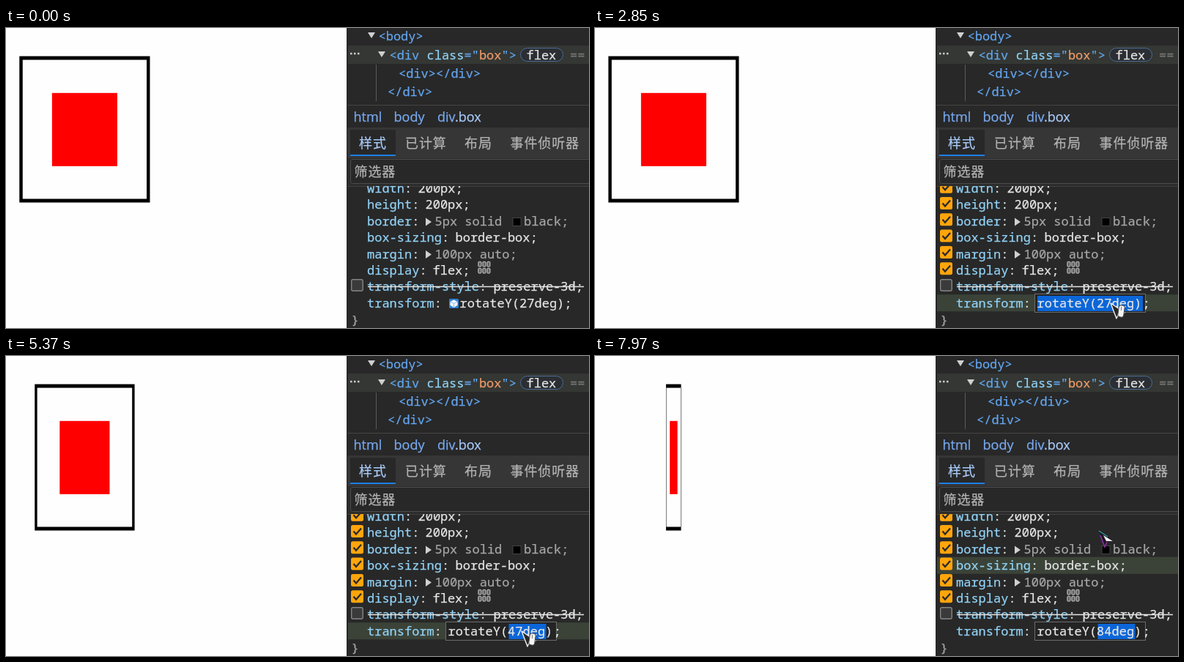
Animation, 796 px wide and 410 px high, one loop 8000 ms. Source, as an HTML page:

```html
<!DOCTYPE html>
<html lang="zh-CN">
<head>
<meta charset="utf-8">
<style>
html, body { margin: 0; width: 100%; height: 100%; overflow: hidden; background: #fefefe; }
svg { display: block; width: 796px; height: 410px; }
text { white-space: pre; }
text, tspan { fill: currentColor; stroke: currentColor; stroke-width: .25px; }
.mono { font: 17px "Noto Sans Mono", "DejaVu Sans Mono", monospace; }
.crumb { font: 18px "Open Sans", "Noto Sans", sans-serif; color: #78aaf0; }
.tab { font: 18px "Noto Sans CJK SC", "Noto Sans CJK", sans-serif; letter-spacing: .9px; color: #b2b2b2; }
.active { color: #a9cbfa; }
.tag { color: #62a5ee; }
.prop { color: #92d2f6; }
.string { color: #ee9a68; }
.val { color: #e6e6e6; }
.dim { color: #a6a6a6; }
.faint { color: #777; }
</style>
</head>
<body>
<svg viewBox="0 0 796 410" lang="zh-CN">
  <defs><clipPath id="rulesClip"><rect x="466" y="216" width="330" height="194"/></clipPath></defs>
  <rect width="796" height="410" fill="#fefefe"/>
  <g id="box">
    <rect x="-97.5" y="41" width="195" height="195" fill="none" stroke="#000" stroke-width="5"/>
    <rect x="-50" y="88.8" width="100" height="100" fill="#f00"/>
  </g>

  <rect x="465" width="331" height="410" fill="#282828"/>
  <g id="tree" class="mono">
    <rect x="467" y="24" width="329" height="25" fill="#343733"/>
    <path d="M505.5 50V100" stroke="#5a5a5a"/>
    <path d="M494 6h10l-5 8zM508 32h10l-5 8z" fill="#d0d0d0"/>
    <path d="M470 35h2.5m2.5 0h2.5m2.5 0h2.5" stroke="#ccc" stroke-width="2.5"/>
    <rect x="702.5" y="27.5" width="58" height="18" rx="9" fill="#2b2e33" stroke="#4b6a94"/>
  </g>
  <path d="M466 105.5H796" stroke="#444"/>
  <text class="crumb" x="474.5" y="128">html</text>
  <text class="crumb" x="529.5" y="128">body</text>
  <text class="crumb" x="589" y="128">div<tspan class="active">.box</tspan></text>

  <rect x="466" y="136" width="330" height="42" fill="#363636"/>
  <rect x="470" y="139" width="62" height="36" fill="#282828"/>
  <rect x="470" y="173" width="62" height="2" fill="#1c7fe6"/>
  <text class="tab active" x="482" y="164">样式</text>
  <text class="tab" x="545" y="164">已计算</text>
  <text class="tab" x="626" y="164">布局</text>
  <text class="tab" x="688.5" y="164">事件侦听器</text>
  <rect x="466" y="178" width="330" height="38" fill="#2c2c2c"/>
  <rect x="470.5" y="179.5" width="335" height="33" rx="3" fill="#282828" stroke="#4c4c4c"/>
  <text class="tab" x="475.5" y="203">筛选器</text>
  <path d="M466 216.5H796" stroke="#404040"/>

  <g class="mono" clip-path="url(#rulesClip)">
    <rect id="hover" x="467" width="329" height="23" fill="#3b4338"/>
    <g id="rules"></g>
    <g id="checks"></g>
    <rect x="471.7" y="343.7" width="15.5" height="15.5" rx="2" fill="#3a3a3a" stroke="#858585" stroke-width="1.4"/>
    <path d="M573 259.5l8 5.5-8 5.5zM573 304l8 5.5-8 5.5z" fill="#d0d0d0"/>
    <rect x="692" y="259.5" width="11" height="11" fill="#000" stroke="#444"/>
    <g id="gridIcon" fill="#5c5c5c" stroke="#a6a6a6" stroke-width="1.5"></g>
    <path d="M494 353.5H789" stroke="#e4e4e4" stroke-width="1.5"/>
    <g id="idle">
      <rect x="605" y="370" width="13" height="13" rx="1.5" fill="#2b7fd4"/>
      <path d="M611.5 371.5l5 2.5v5l-5 3-5-3v-5z" fill="#f4f8ff"/>
      <path d="M606.5 374l5 2.5 5-2.5m-5 2.5v5" fill="none" stroke="#8db9ea"/>
      <text class="val" x="619.5" y="382">rotateY(27deg);</text>
    </g>
    <g id="editor">
      <rect x="600.5" y="363.5" width="151" height="25" fill="#242424" stroke="#6c6c6c"/>
      <rect id="selection" y="366" height="21" fill="#0b66d8"/>
      <text id="value" class="val" x="603.5" y="382"></text>
      <text class="val" x="747.5" y="382">;</text>
    </g>
  </g>

  <g id="cursor">
    <g id="arrow">
      <path d="M0 0L19 13 11 14 8 21z" fill="#282828" stroke="#f2f2f2" stroke-width="1.4" stroke-linejoin="round"/>
      <g id="badge">
        <rect x="10.5" y="3" width="8" height="16" rx="3" transform="rotate(8 14 11)" fill="#f4f4f4" stroke="#444"/>
        <path d="M14.500 5v5" stroke="#777"/>
      </g>
    </g>
    <g id="tinted">
      <path d="M0 0L20 14 11 15 8 22z" fill="#1c1420"/>
      <path d="M0 0L12 8" stroke="#2a9a98" stroke-width="1.5"/>
      <path d="M2 6L8 22 11 15" fill="none" stroke="#8a2fa0" stroke-width="1.5"/>
      <path d="M6 6L19 14H10z" fill="#f6eef8"/>
    </g>
  </g>
</svg>
<script>
const LOOP = 8000;
const NS = 'http://www.w3.org/2000/svg';
const $ = id => document.getElementById(id);

function add(parent, tag, attrs, content = '') {
  const node = document.createElementNS(NS, tag);
  for (const key in attrs) node.setAttribute(key, attrs[key]);
  node.textContent = content;
  parent.append(node);
  return node;
}

function label(parent, x, y, parts) {
  const node = add(parent, 'text', { x, y });
  for (const [cls, content] of parts) add(node, 'tspan', { class: cls }, content);
}

const tree = $('tree');
label(tree, 508.5, 17, [['tag', '<body>']]);
label(tree, 523.5, 42.5, [
  ['tag', '<div '], ['prop', 'class'], ['tag', '="'], ['string', 'box'], ['tag', '">']
]);
label(tree, 710.5, 42.5, [['val', 'flex']]);
label(tree, 770, 42.5, [['faint', '==']]);
label(tree, 536, 68, [['tag', '<div></div>']]);
label(tree, 521, 93, [['tag', '</div>']]);

const rowY = row => 225 + row * 22.4;
[
  ['width', 562.5, '200px;'],
  ['height', 572.5, '200px;'],
  ['border', 585.5, '5px solid', 'dim'],
  ['box-sizing', 613.5, 'border-box;'],
  ['margin', 585.5, '100px auto;', 'dim'],
  ['display', 582.5, 'flex;'],
  ['transform-style', 665.5, 'preserve-3d;'],
  ['transform', 0, '']
].forEach(([name, x, value, cls = 'val'], row) => {
  label($('rules'), 493, rowY(row), [['prop', name], ['val', ':']]);
  if (value) label($('rules'), x, rowY(row), [[cls, value]]);
  if (row < 6) {
    const y = 208.7 + row * 22.3;
    add($('checks'), 'rect', { x: 471, y, width: 17, height: 17, rx: 2.5, fill: '#ffa50c' });
    add($('checks'), 'path', {
      d: `M474.5 ${y + 8.5}l3.5 4 7-8`, fill: 'none', stroke: '#2b2b2b', 'stroke-width': 2.3
    });
  }
});
label($('rules'), 707, rowY(2), [['dim', 'black;']]);
label($('rules'), 471.5, 405, [['dim', '}']]);
for (let i = 0; i < 6; i++) {
  add($('gridIcon'), 'rect', {
    x: 645 + i % 3 * 6, y: 319.5 + (i > 2 ? 9 : 0), width: 3.8, height: 6.5, rx: 1.3
  });
}

// Stepped keys: time, then value(s), each held until the next.
// The first typed angles reach the drawn box one key press late.
const angles = [
  [0, 27], [3510, 28, 27], [4010, 29, 28], [4140, 30], [4270, 32], [4550, 34], [4680, 36],
  [4810, 38], [4970, 41], [5110, 44], [5250, 47], [5390, 50], [5530, 52],
  [5810, 57], [5950, 61], [6090, 66], [6370, 71], [6650, 76], [6930, 80], [7170, 84]
];
const pointer = [
  [0, 900, 500], [90, 772, 402], [250, 752, 388], [410, 735, 379], [570, 723, 373],
  [730, 716, 370], [1550, 715, 371], [1720, 713, 372], [1890, 711, 373], [2070, 709, 374],
  [2240, 707, 375], [2420, 705, 376], [2590, 704, 376],
  [7570, 703, 366], [7700, 699, 330], [7830, 694, 288], [7970, 688, 239]
];
const held = (keys, t) => keys.findLast(key => key[0] <= t);

function render(t) {
  const [, typed, drawn = typed] = held(angles, t);
  const [, x, y] = held(pointer, t);
  const inside = t >= 90;
  const editing = t >= 1010;
  const leaving = t >= 7570;
  const show = (id, on) => $(id).setAttribute('visibility', on ? 'visible' : 'hidden');

  $('box').setAttribute('transform', `translate(107.4) scale(${Math.cos(drawn * Math.PI / 180)} 1)`);
  $('cursor').setAttribute('transform', `translate(${x} ${y})`);
  show('arrow', inside && !leaving);
  show('badge', editing && !leaving);
  show('tinted', leaving);
  show('checks', inside);
  show('hover', inside);

  // The highlight trails the pointer while it leaves quickly.
  const row = t >= 7970 ? 3 : t >= 7830 ? 5 : t >= 7700 ? 6 : 7;
  $('hover').setAttribute('y', rowY(row) - 17.5);

  show('idle', !editing);
  show('editor', editing);
  $('value').textContent = `rotateY(${typed}deg)`;
  const whole = t < 3370;
  $('selection').setAttribute('x', whole ? 604 : 686.5);
  $('selection').setAttribute('width', whole ? 144 : 51);
  show('selection', editing);
}

const start = performance.now();
function tick() {
  render((performance.now() - start) % LOOP);
  requestAnimationFrame(tick);
}
tick();
</script>
</body>
</html>
```
